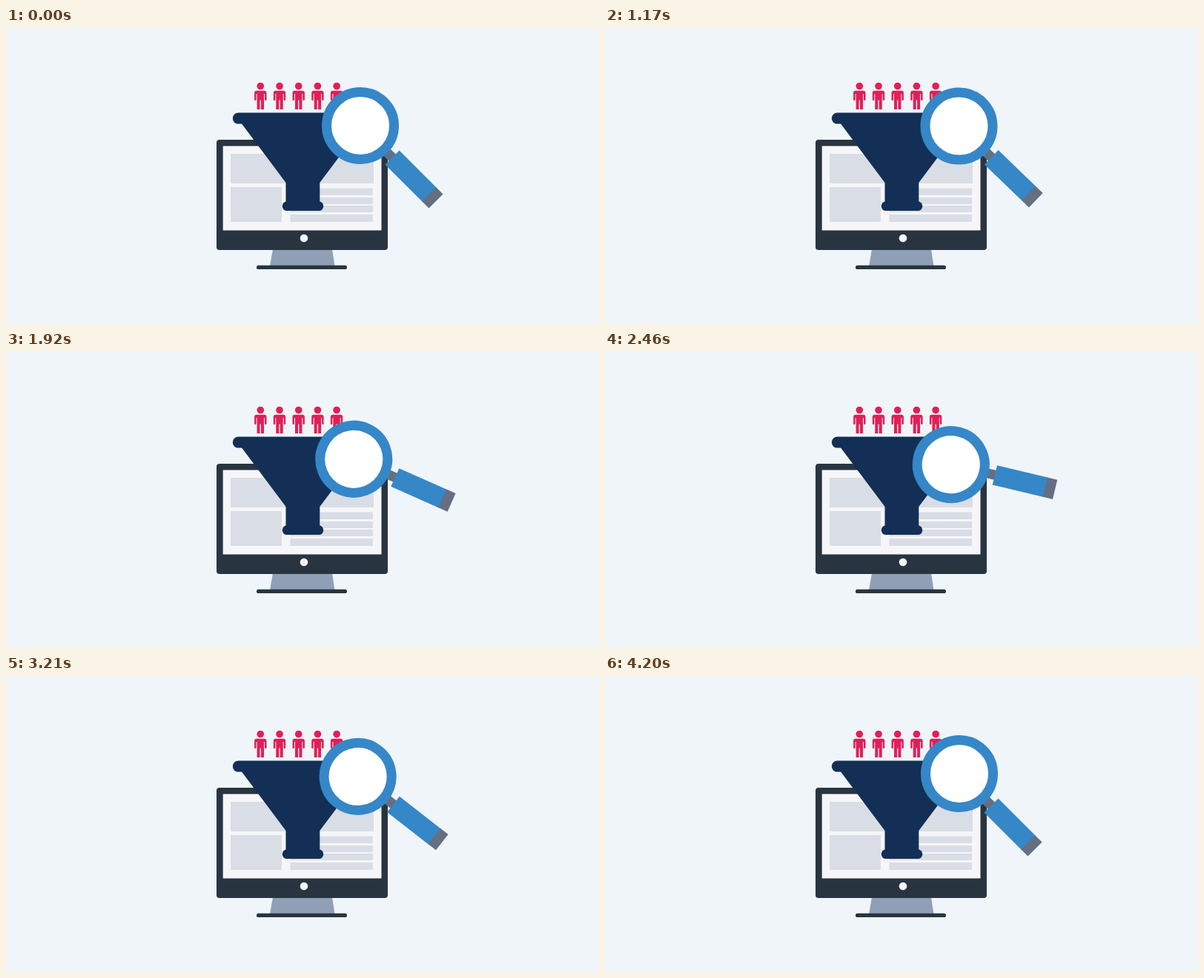
An HTML page for the animation above (4530 ms loop, 800 by 400 pixels).

```html
<!DOCTYPE html>
<html lang="en">
<head>
<meta charset="utf-8">
<title>Audience funnel</title>
<style>
  html, body { margin: 0; width: 100%; height: 100%; overflow: hidden; background: #eff5f8; }
  svg { display: block; width: 100vw; height: 100vh; }
</style>
</head>
<body>
<svg viewBox="0 0 800 400">
  <defs>
    <g id="person" fill="#e31e57">
      <circle cy="78.5" r="4.8"/>
      <path d="M-5.2 84.7H5.2Q8.2 84.7 8.2 87.7V96.8Q8.2 98 7 98T5.7 96.8V89H4.7V110H.7V97.5H-.7V110H-4.7V89H-5.7V96.8Q-5.7 98 -7 98T-8.2 96.8V87.7Q-8.2 84.7 -5.2 84.7Z"/>
    </g>
  </defs>

  <g id="monitor">
    <path d="M360 299H440L443.5 322H356Z" fill="#8f9fb6"/>
    <rect x="338" y="320.8" width="122" height="5.2" rx="2.6" fill="#283541"/>
    <rect x="284" y="151" width="231" height="149" rx="4" fill="#283541"/>
    <rect x="292.7" y="159.5" width="213.8" height="114" fill="#f6f6f8"/>
    <circle cx="402" cy="284" r="5.3" fill="#f6f6f8"/>
    <path fill="#d9dde6" d="M303 170H496V210H303ZM303 215H372V262H303ZM383.5 216.5H495V226H383.5ZM383.5 229H495V238H383.5ZM383.5 240H495V249H383.5ZM383.5 252H495V262H383.5Z"/>
  </g>

  <g id="people"></g>

  <g id="funnel" fill="#132f55">
    <rect x="305.8" y="114.6" width="189.4" height="15" rx="7.5"/>
    <path d="M317 128H484L423.3 209V238H377.5V209Z"/>
    <rect x="372.7" y="234.3" width="55.6" height="12.7" rx="6.3"/>
  </g>

  <g id="magnifier">
    <rect x="6" y="-6.5" width="14" height="13" fill="#656f82"/>
    <rect x="18.4" y="-13.5" width="71" height="27" fill="#3587c8"/>
    <rect x="88.3" y="-13.5" width="13.6" height="27" fill="#656f82"/>
    <circle cx="-42.4" r="45.5" fill="#fff" stroke="#3587c8" stroke-width="13"/>
  </g>
</svg>
<script>
  const LOOP = 4530, STEP = 30;
  // [time in ms, tilt in degrees], joined by straight lines
  const swing = [[0, 45], [600, 25], [1200, 45], [2400, 10], [3000, 45], [3600, 25], [4200, 45]];
  const magnifier = document.getElementById('magnifier');

  document.getElementById('people').innerHTML = Array.from({ length: 5 },
    (_, i) => `<use href="#person" x="${343.3 + i * 25.7}"/>`).join('');

  function tiltAt(time) {
    const next = swing.findIndex(([t]) => t > time);
    if (next < 0) return 45;
    const [t0, a0] = swing[next - 1], [t1, a1] = swing[next];
    return a0 + (a1 - a0) * (time - t0) / (t1 - t0);
  }

  function draw(time) {
    const stepped = Math.floor(time % LOOP / STEP) * STEP;
    magnifier.setAttribute('transform', `translate(508 162) rotate(${tiltAt(stepped)})`);
  }

  const start = performance.now();
  function tick() {
    draw(performance.now() - start);
    requestAnimationFrame(tick);
  }
  tick();
</script>
</body>
</html>
```
